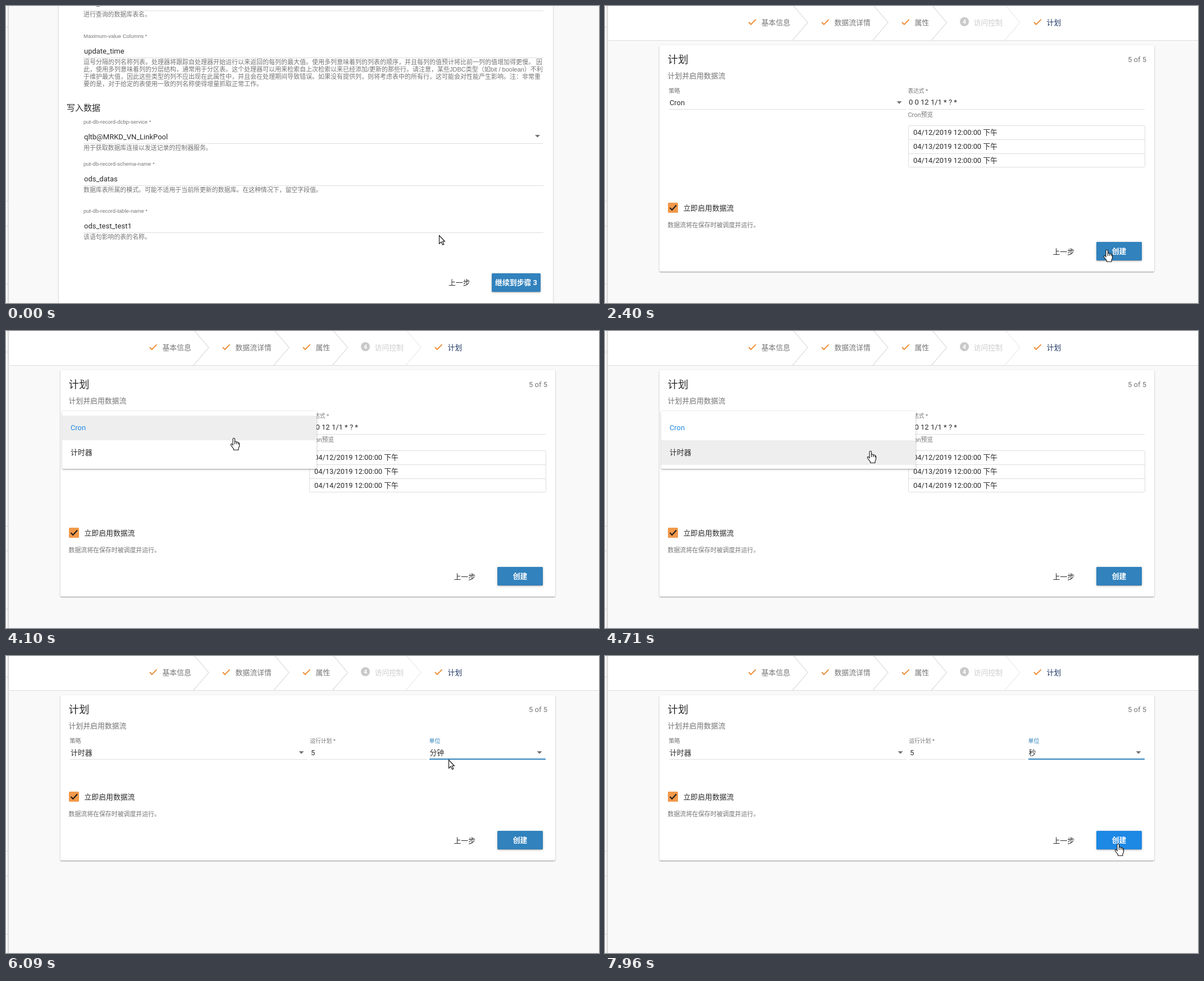
An HTML page with a canvas for the animation above (7.99 s loop, 1056x530 px).

```html
<!DOCTYPE html>
<html lang="zh-CN">
<head>
<meta charset="utf-8">
<title>数据流向导</title>
<style>
html, body { margin: 0; width: 100%; height: 100%; overflow: hidden; background: #f9f9f9; }
canvas { display: block; width: 1056px; height: 530px; }
</style>
</head>
<body>
<canvas id="stage" width="1056" height="530"></canvas>
<script>
const ctx = document.getElementById('stage').getContext('2d');
const LOOP = 7990;
const SANS = 'Roboto, "Noto Sans CJK SC", "Noto Sans CJK", sans-serif';
const ARIAL = '"Liberation Sans", "Noto Sans CJK SC", "Noto Sans CJK", sans-serif';
const DARK = '#2b2b2b', GREY = '#757575', PALE = '#9c9c9c', LINE = '#dedede';
const BLUE = '#3182bd', BRIGHT = '#1e88e5', ORANGE = '#f08a2c', NAVY = '#1f3864';
const BODY = 12.85, SMALL = 10.9;

// Scene and interaction times, ms
const T = { props: 1010, plan: 2400, openA: 3560, pickA: 4800, openB: 6100, pickB: 6790 };

// Pointer path: time, x, y, hand shape
const PATH = [
  [0, 771, 409, 0], [330, 870, 482, 1], [560, 910, 508, 1], [810, 913, 489, 1],
  [860, 919, 489, 1], [1009, 919, 489, 1], [1010, 918, 500, 0], [1340, 918, 500, 0],
  [1700, 908, 450, 1], [2110, 894, 435, 1], [2730, 894, 435, 1], [2870, 850, 408, 0],
  [3400, 470, 183, 1], [3490, 458, 165, 1], [3700, 458, 165, 1], [4100, 406, 191, 1],
  [4320, 404, 212, 1], [4550, 404, 213, 1], [4900, 553, 216, 0], [5040, 624, 214, 0],
  [5200, 690, 207, 0], [5970, 788, 185, 0], [6110, 788, 185, 0], [6200, 784, 190, 1],
  [6620, 772, 212, 1], [6780, 772, 212, 1], [6950, 800, 240, 0], [7390, 902, 301, 0],
  [7620, 902, 301, 0], [7750, 908, 314, 1], [7960, 914, 335, 1], [LOOP, 914, 335, 1]
];

const clamp = v => Math.max(0, Math.min(1, v));
const ramp = (t, start, len) => clamp((t - start) / len);

function text(str, x, cy, size, color = DARK, opt = {}) {
  ctx.font = `${opt.weight || 400} ${size}px ${opt.font || SANS}`;
  ctx.textAlign = opt.align || 'left';
  ctx.fillStyle = color;
  ctx.fillText(str, x, Math.round(cy + size * 0.37));
}

function rect(x, y, w, h, color) {
  ctx.fillStyle = color;
  ctx.fillRect(x, y, w, h);
}

function stroke(points, color, width = 1) {
  ctx.beginPath();
  points.forEach(([x, y]) => ctx.lineTo(x, y));
  ctx.strokeStyle = color;
  ctx.lineWidth = width;
  ctx.stroke();
}

// Box with a soft shadow and a tight one below its edge
function raised(x, y, w, h, color, soft = 3) {
  ctx.save();
  ctx.fillStyle = color;
  ctx.beginPath();
  ctx.roundRect(x, y, w, h, 2);
  ctx.shadowOffsetY = 1;
  [[soft, 0.22], [1, 0.24]].forEach(([blur, alpha]) => {
    ctx.shadowBlur = blur;
    ctx.shadowColor = `rgba(0,0,0,${alpha})`;
    ctx.fill();
  });
  ctx.restore();
}

function mix(k) {
  const a = [49, 130, 189], b = [30, 136, 229];
  return `rgb(${a.map((v, i) => Math.round(v + (b[i] - v) * k))})`;
}

function button(label, x, y, w, hover) {
  raised(x, y, w, 33, mix(hover), 4);
  text(label, x + w / 2, y + 16.5, BODY, '#fff', { weight: 700, align: 'center' });
}

function underline(x1, x2, y, active) {
  rect(x1, y, x2 - x1, active ? 2 : 1, active ? BLUE : LINE);
}

function arrow(x, y) {
  ctx.fillStyle = GREY;
  ctx.beginPath();
  ctx.moveTo(x - 4.5, y - 2);
  ctx.lineTo(x + 4.5, y - 2);
  ctx.lineTo(x, y + 2.8);
  ctx.fill();
}

function tick(x, y, color) {
  stroke([[x - 6, y], [x - 2.2, y + 4], [x + 6.5, y - 4.8]], color, 1.9);
}

function backdrop() {
  rect(0, 0, 1056, 530, '#f9f9f9');
}

function edge() {
  rect(0, 0, 3, 530, '#fbfbfb');
  [37, 348, 392, 496].forEach(y => rect(0, y, 3, 1, '#d8d8d8'));
  rect(3, 0, 1, 530, '#cfcfcf');
  rect(4, 0, 1, 530, '#e2e2e2');
  rect(5, 0, 1, 530, '#f1f1f1');
}

function field(label, value, hint, y) {
  text(label, 138, y - 27, 9.5, GREY, { font: ARIAL });
  text(value, 139, y, 13);
  underline(138, 957, y + 12);
  text(hint, 138, y + 19.5, SMALL, GREY, { font: ARIAL });
}

function databaseForm(t) {
  raised(94, -10, 880, 560, '#fff');
  rect(161, 0, 6, 1, '#777');
  underline(138, 957, 8);
  text('进行查询的数据库表名。', 138, 15, SMALL, GREY, { font: ARIAL });
  field('Maximum-value Columns *', 'update_time', '', 80);
  [
    '逗号分隔的列名称列表。处理器将跟踪自处理器开始运行以来返回的每列的最大值。使用多列意味着列的列表的顺序，并且每列的值预计将比前一列的值增加得更慢。 因',
    '此，使用多列意味着列的分层结构，通常用于分区表。这个处理器可以用来检索自上次检索以来已经添加/更新的那些行。请注意，某些JDBC类型（如bit / boolean）不利',
    '于维护最大值，因此这些类型的列不应出现在此属性中，并且会在处理期间导致错误。如果没有提供列，则将考虑表中的所有行，这可能会对性能产生影响。注：非常重',
    '要的是，对于给定的表使用一致的列名称使得增量抓取正常工作。'
  ].forEach((s, i) => text(s, 138, 99.5 + i * 13, 11, GREY, { font: ARIAL }));
  text('写入数据', 108, 181, 15, DARK, { weight: 300 });
  field('put-db-record-dcbp-service *', 'qltb@MRKD_VN_LinkPool', '用于获取数据库连接以发送记录的控制器服务。', 233);
  arrow(946.5, 232);
  field('put-db-record-schema-name *', 'ods_datas', '数据库表所属的模式。可能不适用于当前所更新的数据库。在这种情况下，留空字段值。', 308);
  field('put-db-record-table-name *', 'ods_test_test1', '该语句影响的表的名称。', 392);
  text('上一步', 788, 493.5, BODY);
  button('继续到步骤 3', 865, 477, 87, ramp(t, 330, 200));
}

function stepper(active) {
  rect(4, 0, 1052, 61, '#fff');
  rect(4, 61, 1052, 1, '#dcdcdc');
  const steps = [['基本信息', 262], ['数据流详情', 392], ['属性', 535], ['访问控制', 640], ['计划', 770]];
  steps.forEach(([name, x], i) => {
    if (i === 3) {
      ctx.fillStyle = '#c9c9c9';
      ctx.beginPath();
      ctx.arc(640, 28, 8, 0, 7);
      ctx.fill();
      text('4', 640, 28, 10.5, '#fff', { weight: 700, align: 'center' });
    } else {
      tick(x, 29, ORANGE);
    }
    text(name, x + 16.5, 29.5, BODY, i === active ? NAVY : i === 3 ? '#cccccc' : GREY);
  });
  [361, 504, 608.5, 739].forEach((x, i) =>
    stroke([[x - 25, 0], [x, 29.5], [x - 27, 61]], i === 3 ? '#e2e2e2' : '#cbcbcb'));
}

function card(title, sub, page, bottom, titleY, subY) {
  raised(97, 70, 881, bottom - 70, '#fff');
  text(title, 111.5, titleY, 18.4, DARK, { weight: 300 });
  text(sub, 111.5, subY, BODY, GREY);
  text(page + ' of 5', 964, titleY, 13, GREY, { align: 'right' });
}

function propertiesForm(t) {
  stepper(2);
  card('业务属性', '提供其他业务元数据', 3, 471, 99, 130.5);
  text('数据所有者', 114.5, 173.5, BODY, PALE);
  underline(114, 961, 184);
  raised(119, 231, 81, 33, '#fafafa', 4);
  text('添加属性', 159.5, 247.5, BODY, DARK, { align: 'center' });
  text('标签', 113.5, 303, SMALL, PALE);
  text('添加标签', 117, 331.5, 14.8, PALE);
  underline(114, 961, 354);
  text('上一步', 791.5, 435, BODY);
  button('继续到步骤 5', 869, 418, 87, ramp(t, 1700, 200));
}

function planFooter(dy, hover) {
  ctx.save();
  ctx.translate(0, dy);
  ctx.fillStyle = '#f2994a';
  ctx.beginPath();
  ctx.roundRect(112, 351, 18, 18, 1.5);
  ctx.fill();
  stroke([[115.5, 360], [119.3, 364], [127, 355.5]], '#1c1c1c', 2);
  text('立即启用数据流', 139.5, 360, BODY);
  text('数据流将在保存时被调度并运行。', 111.5, 390.5, SMALL, GREY);
  text('上一步', 797.5, 438, BODY);
  button('创建', 875, 421, 81, hover);
  ctx.restore();
}

// Dropdown list; rows are 44 px high
function menu(x, y, w, items, chosen, focus, alpha) {
  if (alpha <= 0) return;
  ctx.save();
  ctx.globalAlpha = alpha;
  raised(x, y, w, items.length * 44 + 15, '#fff', 4);
  items.forEach((name, i) => {
    const top = y + 8 + i * 44;
    if (i === focus) rect(x, top, w, 44, '#eeeeee');
    text(name, x + 15, top + 21.5, BODY, i === chosen ? BRIGHT : DARK);
  });
  ctx.restore();
}

function planForm(t) {
  const timer = t >= T.pickA;
  const focusA = t >= T.openA && t < 5800;
  const focusB = t >= 5900;
  stepper(4);
  card('计划', '计划并启用数据流', 5, timer ? 365 : 474, 95.5, 124);
  text('策略', 113.5, 151, 10, focusA ? BLUE : GREY);
  text(timer ? '计时器' : 'Cron', 115, 172, BODY);
  underline(114, 537, 184, focusA && t > 5090);

  if (timer) {
    arrow(526, 172);
    text('运行计划 *', 541.5, 151, 9.7, GREY);
    text('5', 543, 172, 13);
    underline(542, 749, 184);
    text('单位', 753.5, 151, 10, focusB ? BLUE : GREY);
    text(t < T.pickB ? '分钟' : '秒', 754.5, 172, BODY);
    arrow(950, 172);
    underline(754, 961, focusB ? 183 : 184, focusB);
    planFooter(-109, ramp(t, 7740, 180));
  } else {
    arrow(524, 172);
    text('表达式 *', 539.5, 151, 9.7, GREY);
    text('0 0 12 1/1 * ? *', 541, 171.5, 13);
    underline(540, 961, 184);
    text('Cron预览', 539.5, 193.5, SMALL, GREY);
    ctx.strokeStyle = '#dddddd';
    ctx.lineWidth = 1;
    ctx.beginPath();
    ctx.roundRect(540.5, 213.5, 421, 74, 2);
    ctx.stroke();
    [12, 13, 14].forEach((day, i) => {
      if (i) rect(540, 213 + i * 25, 421, 1, '#dddddd');
      text(`04/${day}/2019 12:00:00 下午`, 549, 225.5 + i * 24.7, BODY);
    });
    planFooter(0, Math.min(ramp(t, 2470, 200), 1 - ramp(t, 2850, 200)));
  }

  const row = t > 4150 ? 1 : 0;
  menu(100, 143, 453, ['Cron', '计时器'], timer ? 1 : 0, row,
    Math.min(ramp(t, T.openA, 200), 1 - ramp(t, T.pickA, 255)));
  menu(740, 55, 238, ['天', '小时', '分钟', '秒'], t < T.pickB ? 2 : 3, t > 6300 ? 3 : 2,
    Math.min(ramp(t, T.openB, 200), 1 - ramp(t, T.pickB, 255)));
}

const ARROW = new Path2D('M.5.5V15.2L4 12 6.6 17.3 8.8 16.3 6.4 11H10.4Z');
const HAND = new Path2D('M-2 2Q-2 .3-.3.3 1.5.3 1.5 2V7Q1.6 6 3 6 4.6 6 4.8 7.5 5.2 6.8 6.4 7 7.8 7.3 8 8.8 9.6 8.3 9.6 10.3V14Q9.6 16 8 18V21.3H-.5V19.5L-5 13.5Q-6.3 11-5 10.5-3.5 10.2-2 12.5Z');
const FINGERS = new Path2D('M1.5 7V11M4.8 7.5V11M8 8.8V11.5');

function pointer(t) {
  const i = Math.max(0, PATH.findIndex(p => p[0] > t) - 1);
  const [t0, x0, y0, hand] = PATH[i], [t1, x1, y1] = PATH[i + 1];
  const k = (t - t0) / (t1 - t0);
  ctx.save();
  ctx.translate(Math.round(x0 + (x1 - x0) * k), Math.round(y0 + (y1 - y0) * k));
  ctx.fillStyle = '#fff';
  ctx.strokeStyle = '#111';
  ctx.lineWidth = 1.1;
  const shape = hand ? HAND : ARROW;
  ctx.fill(shape);
  ctx.stroke(shape);
  if (hand) ctx.stroke(FINGERS);
  ctx.restore();
}

function draw(t) {
  backdrop();
  if (t < T.props) databaseForm(t);
  else if (t < T.plan) propertiesForm(t);
  else planForm(t);
  edge();
  pointer(t);
}

const start = performance.now();
function loop() {
  draw((performance.now() - start) % LOOP);
  requestAnimationFrame(loop);
}
loop();
</script>
</body>
</html>
```
